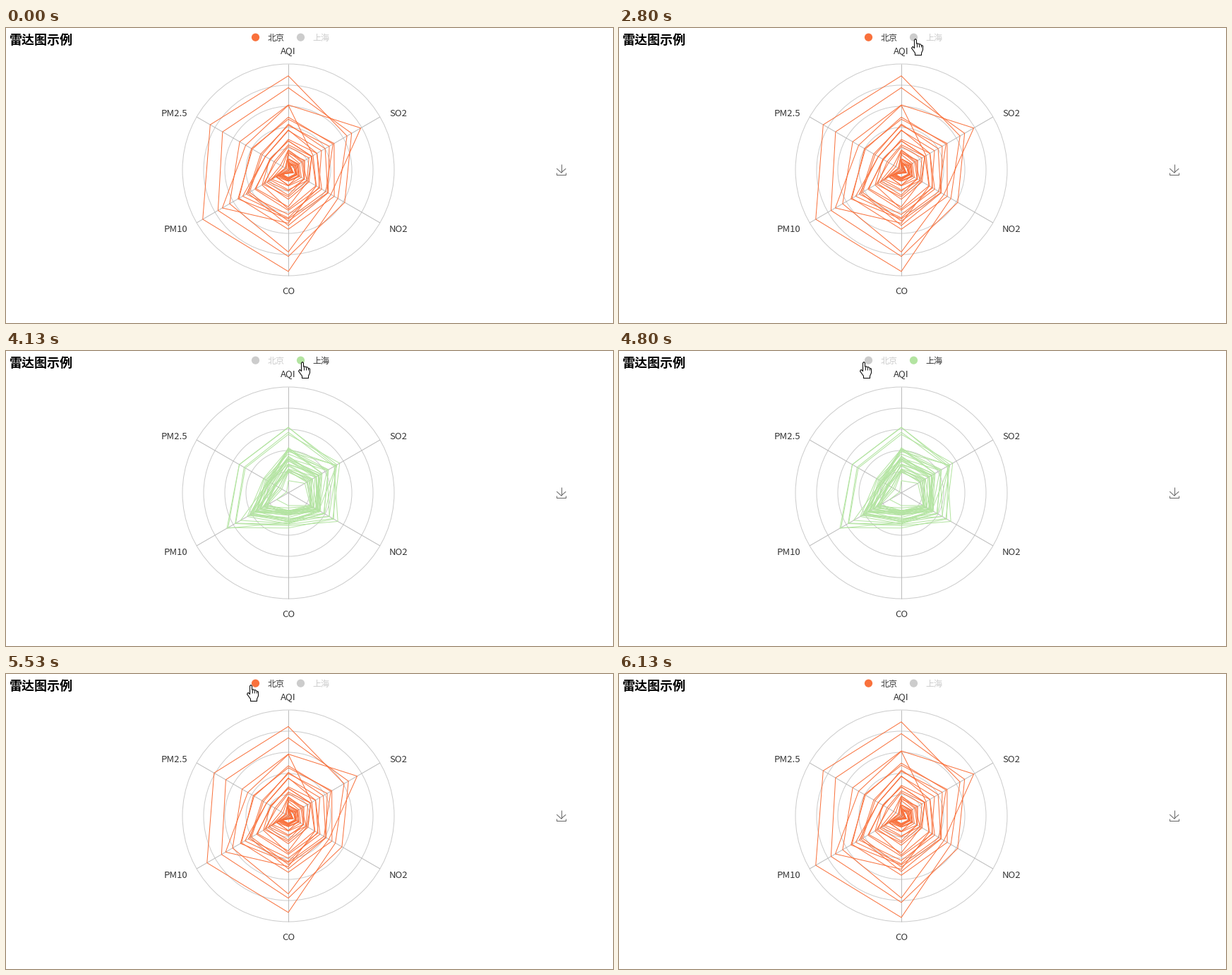
These frames come from a looping animation (860x418 px, 8590 ms). A matplotlib script:

```python
import numpy as np
import matplotlib.pyplot as plt
from matplotlib.animation import FuncAnimation
from matplotlib.collections import LineCollection
from matplotlib.patches import Circle, Polygon

W, H, DPI = 860, 418, 100
LOOP, FRAMES = 8590, 129
CX, CY, R = 400, 201, 150
PX = 72 / DPI
ORANGE, GREEN, GREY, DARK = "#f9713c", "#b3e4a1", "#cccccc", "#333333"

NAMES = ["AQI", "PM2.5", "PM10", "CO", "NO2", "SO2"]
LOW = np.array([5, 20, 0, 0, 0, 0])
HIGH = np.array([300, 250, 300, 5, 200, 100])
ANGLES = np.pi / 2 + np.arange(6) * np.pi / 3
DIRS = np.column_stack([np.cos(ANGLES), -np.sin(ANGLES)])


def crowd(n, low, high, power, noise, seed):
    """Days whose readings rise together from low to high, each a little off."""
    rng = np.random.default_rng(seed)
    level = np.linspace(0, 1, n)[:, None] ** power
    wobble = np.exp(noise * np.clip(rng.normal(size=(n, 6)), -1.5, 1.5))
    return (np.array(low) + level * np.subtract(high, low)) * wobble


def to_polygons(days):
    # Readings below an axis minimum cross to the far side of the centre.
    reach = (days - LOW) / (HIGH - LOW) * R
    shape = reach[:, :, None] * DIRS
    return np.concatenate([shape, shape[:, :1]], axis=1)


# The most polluted days are given, the others follow a rule.
beijing = to_polygons(np.vstack([
    [267, 216, 280, 4.8, 108, 64],
    [234, 185, 230, 4.09, 123, 69],
    [186, 142, 192, 3.88, 93, 79],
    [185, 127, 216, 2.52, 61, 27],
    crowd(27, [24, 8, 24, .38, 16, 6], [158, 118, 175, 2.9, 92, 52], 2.2, .1, 3),
]))
shanghai = to_polygons(np.vstack([
    [188, 143, 197, 1.66, 99, 51],
    [187, 143, 201, 1.39, 89, 53],
    [174, 131, 174, 1.55, 108, 50],
    [168, 128, 172, 1.49, 97, 56],
    [39, 24, 38, .6, 48, 18],
    crowd(26, [68, 42, 70, .8, 48, 22], [122, 83, 135, 1.3, 76, 46], 1, .11, 5),
]))

fig = plt.figure(figsize=(W / DPI, H / DPI), dpi=DPI, facecolor="white")
ax = fig.add_axes([0, 0, 1, 1])
ax.set_xlim(0, W)
ax.set_ylim(H, 0)
ax.axis("off")


def label(x, y, text, size, color=DARK, **kw):
    """Text whose middle line lies at y."""
    return ax.text(x, y + .37 * size, text, fontsize=size * PX, color=color,
                   va="baseline", family="Noto Sans CJK JP", zorder=5, **kw)


def stroke(xs, ys, color, z):
    ax.plot(xs, ys, color=color, lw=PX, zorder=z, solid_capstyle="butt")


def legend_item(x, text):
    icon = ax.add_patch(Circle((x, 13.2), 5.6, lw=0, zorder=5))
    return icon, label(x + 17.2, 13.5, text, 12)


def paint_item(item, color, active):
    icon, text = item
    icon.set_facecolor(color if active else GREY)
    text.set_color(DARK if active else GREY)


# Title, grid and axis names
label(5, 16, "雷达图示例", 18, "black", weight="bold")
for ring in range(1, 6):
    ax.add_patch(Circle((CX, CY), ring * R / 5, fill=False, ec=GREY, lw=PX, zorder=1))
for name, (dx, dy) in zip(NAMES, DIRS):
    stroke([CX, CX + R * dx], [CY, CY + R * dy], "#bbbbbb", 2)
    align = "center" if abs(dx) < .1 else "left" if dx > 0 else "right"
    gap = R + 15 + 6 * (abs(dx) < .1)
    label(CX + gap * dx, CY + gap * dy + 1 - .5 * dy, name, 13.1, ha=align)

# Download icon
for pts in ([(0, 5.9), (6.4, 11.75), (13, 6.05)],
            [(0, 11.3), (0, 15), (12.7, 15), (12.7, 11.3)],
            [(6.4, 11.7), (6.4, 0)]):
    xs, ys = np.array(pts).T
    stroke(xs + 780.2, ys + 193.2, "#666666", 3)

item_bj = legend_item(353.5, "北京")
item_sh = legend_item(417.5, "上海")
lines = LineCollection([], linewidths=PX, joinstyle="bevel", zorder=3)
ax.add_collection(lines)

# Mouse pointers, relative to their tip
ARROW = np.array([(.5, .5), (.5, 16.5), (4, 13.2), (6.5, 18.5), (9, 17.5),
                  (6.7, 12.2), (11.5, 12)])
HAND = np.array([
    (-1.5, 2), (0, .5), (1.5, 2), (1.5, 7.2), (3.5, 6.8), (4.8, 8),
    (6.5, 7.6), (7.8, 9), (10.5, 10.2), (10.5, 16), (8.5, 20.5),
    (8.5, 23.5), (-.5, 23.5), (-.5, 20.5), (-5.5, 13.5), (-3.8, 11.3),
    (-1.5, 13.6)])
pointer = Polygon(ARROW, closed=True, fc="white", ec="#111111", lw=PX * 1.1,
                  joinstyle="round", zorder=8)
ax.add_patch(pointer)
KNUCKLES = np.array([[(x, 7 + x / 5), (x, 11.5)] for x in (1.5, 4.7, 7.8)])
knuckles = LineCollection([], colors="#111111", linewidths=PX, zorder=9)
ax.add_collection(knuckles)

# Pointer tracks as key points: step, x, y
TRACKS = [np.array(t).T for t in (
    [(5, 835, 402), (17, 251, 375), (23, 32, 27)],
    [(29, 258, 254), (38, 449, 8), (42, 420, 15), (67, 420, 15), (70, 383, 8),
     (72, 347, 15), (86, 347, 15), (91, 23, 45)],
)]
SHANGHAI_CLICK, BEIJING_CLICK = 47, 77


def place_pointer(step):
    track = next((t for t in TRACKS if t[0][0] <= step <= t[0][-1]), None)
    pointer.set_visible(track is not None)
    on_legend = 41 <= step <= 67 or 72 <= step <= 86
    knuckles.set_visible(on_legend)
    if track is None:
        return
    steps, xs, ys = track
    tip = np.array([np.interp(step, steps, xs), np.interp(step, steps, ys)])
    pointer.set_xy((HAND if on_legend else ARROW) + tip)
    knuckles.set_segments(KNUCKLES + tip)


def growth(step, head_start):
    """Cubic ease-out."""
    return 1 - (1 - min(1, head_start + .0754 * step)) ** 3


def update(step):
    show_sh = SHANGHAI_CLICK <= step < BEIJING_CLICK
    paint_item(item_bj, ORANGE, not show_sh)
    paint_item(item_sh, GREEN, show_sh)
    scale = 1
    if show_sh:
        scale = growth(step - SHANGHAI_CLICK, .14)
    elif step >= BEIJING_CLICK:
        scale = growth(step - BEIJING_CLICK, .18)
    shapes = shanghai if show_sh else beijing
    lines.set_segments(list(shapes * scale + (CX, CY)))
    lines.set_color(GREEN if show_sh else ORANGE)
    place_pointer(step)
    return lines, pointer, knuckles


anim = FuncAnimation(fig, update, frames=FRAMES, interval=LOOP / FRAMES,
                     init_func=lambda: update(0), repeat=True, repeat_delay=0, blit=False)
plt.show()
```
